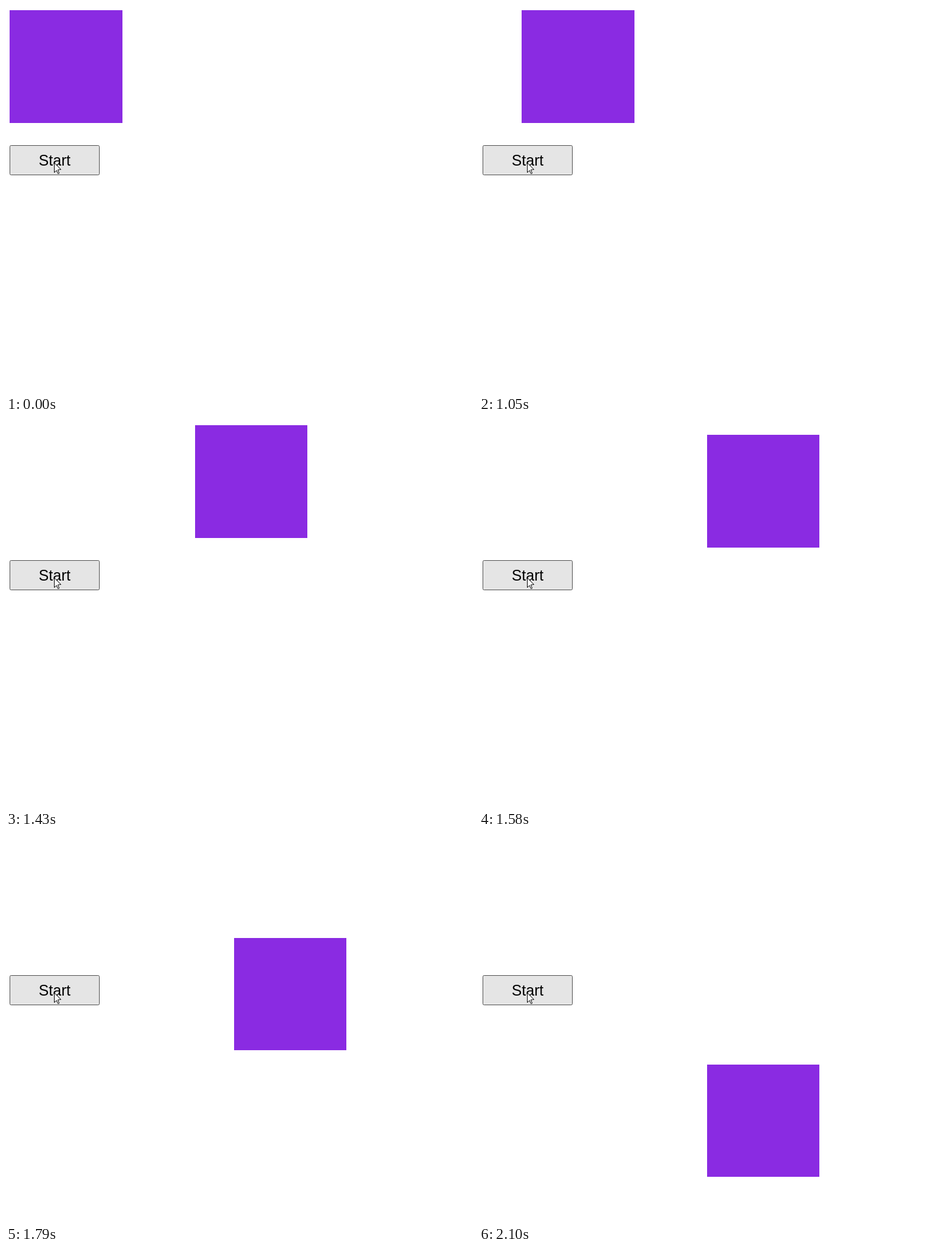
Animation of 778 by 645 pixels, one loop 2940 ms. Source, as an HTML page with a canvas:

```html
<!DOCTYPE html>
<html lang="en">
<head>
<meta charset="utf-8">
<title>Moving square</title>
<style>
  html, body { margin: 0; width: 100%; height: 100%; overflow: hidden; background: #fff; }
  canvas { display: block; }
</style>
</head>
<body>
<canvas id="stage" width="778" height="645"></canvas>
<script>
const ctx = document.getElementById('stage').getContext('2d');
const LOOP = 2940;
const STRIDE = 16.25;   // distance covered by one tick
const LEG = 23;         // ticks per side of the path
const SIZE = 187.5;
const RELEASE = 940;    // mouse button goes up

// [time, ticks so far, screen refreshes since the previous entry]
const KEYS = [
  [860, -2, 1], [1200, 10, 8], [1360, 16, 4], [1430, 19, 2],
  [1580, 25, 5], [1790, 34, 7], [1900, 39, 3], [2100, 47, 6]
];

const clamp = (v, lo, hi) => Math.min(hi, Math.max(lo, v));

function ticksAt(t) {
  if (t < KEYS[0][0]) return 0;
  for (let i = 1; i < KEYS.length; i++) {
    const [t0, n0] = KEYS[i - 1];
    const [t1, n1, steps] = KEYS[i];
    if (t < t1) {
      const done = Math.floor((t - t0) / (t1 - t0) * steps + 0.05) / steps;
      return Math.round(n0 + (n1 - n0) * done);
    }
  }
  return KEYS[KEYS.length - 1][1];
}

function drawSquare(t) {
  const n = ticksAt(t);
  const x = 6 + clamp(n, 0, LEG) * STRIDE;
  const y = 7 + clamp(n - LEG - 1, 0, LEG) * STRIDE;  // one idle tick at the corner
  const left = Math.round(x), top = Math.round(y);
  ctx.fillStyle = '#8a2be2';
  ctx.fillRect(left, top, Math.round(x + SIZE) - left, Math.round(y + SIZE) - top);
}

function drawButton() {
  ctx.beginPath();
  ctx.roundRect(6.5, 232.5, 149, 49, 2);
  ctx.fillStyle = '#e5e5e5';
  ctx.fill();
  ctx.lineWidth = 1;
  ctx.strokeStyle = '#4f4f4f';
  ctx.stroke();
  ctx.fillStyle = '#000';
  ctx.font = '25px "Liberation Sans", Arial, sans-serif';
  ctx.textAlign = 'center';
  ctx.fillText('Start', 81, 266);
}

function drawCursor() {
  const outline = [[0, 0], [0, 16], [3.6, 12.6], [6.2, 18], [8.2, 17.2], [5.8, 11.6], [11, 11]];
  ctx.beginPath();
  for (const [x, y] of outline) ctx.lineTo(80.5 + x, 261.5 + y);
  ctx.closePath();
  ctx.fillStyle = '#fff';
  ctx.fill();
  ctx.strokeStyle = '#000';
  ctx.stroke();
}

function drawClick() {
  ctx.beginPath();
  ctx.arc(80, 262, 15, 0, Math.PI * 2);
  ctx.fillStyle = 'rgba(255, 255, 0, 0.47)';
  ctx.fill();
}

function draw(t) {
  ctx.fillStyle = '#fff';
  ctx.fillRect(0, 0, 778, 645);
  drawButton();
  drawSquare(t);
  drawCursor();
  if (t >= KEYS[0][0] && t < RELEASE) drawClick();
}

const start = performance.now();
function frame() {
  draw((performance.now() - start) % LOOP);
  requestAnimationFrame(frame);
}
frame();
</script>
</body>
</html>
```
